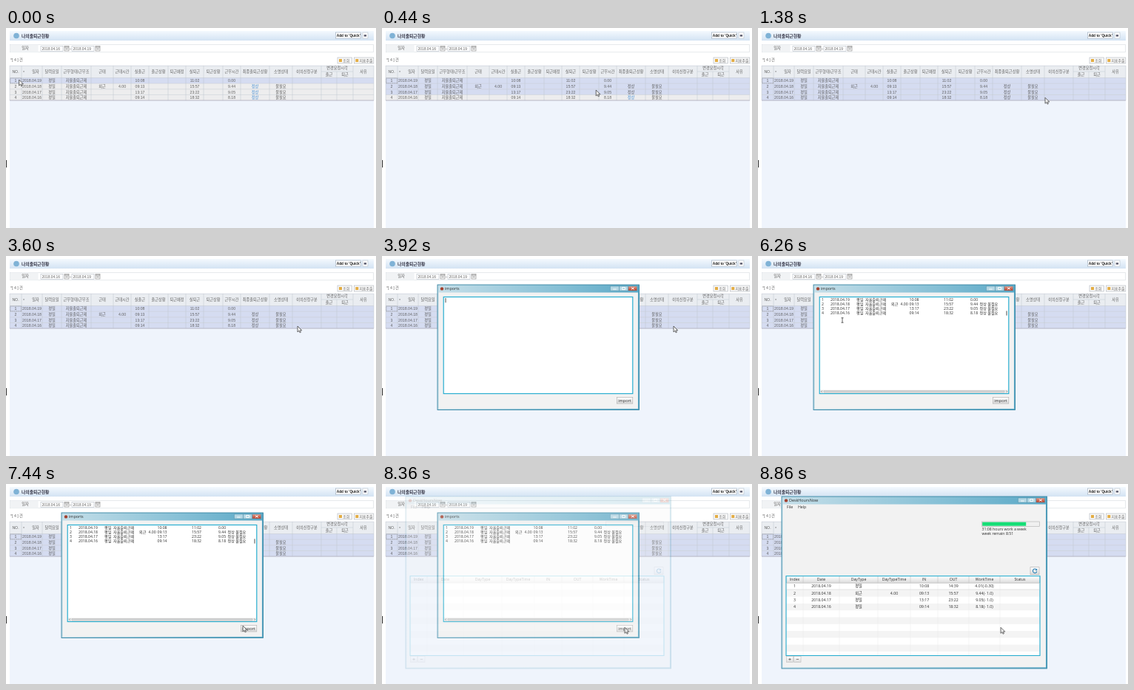
Recreate the animation shown at these times as an HTML page. Size 500 by 271 pixels, loop 9.02 s.

```html
<!DOCTYPE html>
<html>
<head>
<meta charset="utf-8">
<title>Timesheet import</title>
<style>
html, body { margin: 0; width: 100%; height: 100%; overflow: hidden; background: #fff; }
svg { display: block; width: 500px; height: 271px; }
text { font: 5.2px "Liberation Sans", "Noto Sans CJK KR", "Noto Sans CJK", sans-serif; fill: #606060; white-space: pre; }
.app text { font-family: "Open Sans", "Noto Sans CJK KR", "Noto Sans CJK", sans-serif; fill: #2c2c2c; }
</style>
</head>
<body>
<svg id="stage" viewBox="0 0 500 271">
  <defs>
    <linearGradient id="bar" x2="0" y2="1"><stop stop-color="#f4f9fe"/><stop offset="1" stop-color="#d3e3f3"/></linearGradient>
    <linearGradient id="glass"><stop stop-color="#c6dfe9"/><stop offset=".6" stop-color="#86c0d6"/><stop offset="1" stop-color="#5aa8c6"/></linearGradient>
    <linearGradient id="face" x2="0" y2="1"><stop stop-color="#fff"/><stop offset="1" stop-color="#dcdcdc"/></linearGradient>
    <linearGradient id="close" x2="0" y2="1"><stop stop-color="#e39a88"/><stop offset="1" stop-color="#b93a24"/></linearGradient>
  </defs>
</svg>
<script>
const LOOP = 9020;
const stage = document.getElementById('stage');

function add(parent, tag, attrs = {}, content = '') {
  const el = document.createElementNS('http://www.w3.org/2000/svg', tag);
  for (const k in attrs) el.setAttribute(k, attrs[k]);
  el.textContent = content;
  return parent.appendChild(el);
}
const group = (parent, attrs) => add(parent, 'g', attrs);
const box = (g, x, y, width, height, fill, stroke = 'none', sw = .6) =>
  add(g, 'rect', { x, y, width, height, fill, stroke, 'stroke-width': sw });
const path = (g, d, stroke, sw = .6, fill = 'none') =>
  add(g, 'path', { d, stroke, 'stroke-width': sw, fill });
const label = (g, x, y, str, style = '') => add(g, 'text', { x, y, style }, str);
const mid = (g, x, y, str, style = '') => label(g, x, y, str, 'text-anchor:middle;' + style);
const show = (el, on) => el.setAttribute('opacity', +on);

// Attendance page
const page = group(stage);
const rowsAt = 67.5, rowH = 7.65;
const cols = [5, 21, 49, 75, 115, 145, 169, 193, 219, 243, 267, 293, 317, 356, 387, 426, 447, 469, 497];
const heads = ['NO.', '', '달력요일', '근무형태/근무조', '근태', '근태시간', '실출근', '출근상황', '퇴근예정',
  '실퇴근', '퇴근상황', '근무시간', '최종출퇴근상황', '소명상태', '이의신청구분', '출근', '퇴근', '사유'];
const days = [
  { date: '2018.04.19', start: '10:08', end: '11:02', hours: '0.00' },
  { date: '2018.04.18', start: '09:13', end: '15:57', hours: '9.44', kind: '외근', off: '4.00', ok: 1 },
  { date: '2018.04.17', start: '13:17', end: '23:22', hours: '9.05', ok: 1 },
  { date: '2018.04.16', start: '09:14', end: '18:32', hours: '8.18', ok: 1 }
];

function drawTop() {
  box(page, 0, 0, 500, 271, '#fff');
  box(page, 5, 98, 492, 173, '#eff4fc');
  box(page, 0, 179, 1, 10, '#333');
  box(page, 5, 4, 492, 13, 'url(#bar)');
  add(page, 'circle', { cx: 14, cy: 10.5, r: 3.8, fill: '#7fb2d6' });
  label(page, 21, 12.8, '나의출퇴근현황', 'font-size:5.8px;font-weight:bold;fill:#334');
  box(page, 445.5, 6, 34, 8, '#fff', '#9aa9ba');
  mid(page, 462.8, 11.8, "Add to 'Quick'", 'font-size:4.8px;font-weight:bold;fill:#222');
  box(page, 482, 6, 7, 8, '#fff', '#b5bfca');
  box(page, 483.7, 9, 3.4, 2.6, '#667');

  box(page, 5.3, 22.3, 491.4, 10.5, '#fff', '#d5dae0');
  box(page, 5.6, 22.6, 38, 10, '#f1f3f5');
  mid(page, 26, 29, '일자');
  [[47, '2018.04.16'], [89, '2018.04.19']].forEach(([x, str]) => {
    box(page, x, 24.3, 30, 7, '#fff', '#b5bcc6');
    label(page, x + 1.5, 29.6, str, 'font-size:4.9px');
    box(page, x + 32, 24.5, 6, 6.5, '#f5f5f5', '#888');
    path(page, `M${x + 32} 26h6M${x + 33.5} 28.3h3`, '#777', .8);
  });
  label(page, 85.6, 29.5, '~');
  label(page, 6, 45.2, '*[ 4 ] 건');
  [[448, 19.5, '조회'], [470.3, 26.5, '지표추출']].forEach(([x, w, str]) => {
    box(page, x, 40, w, 8, '#f8f8f8', '#b0b5bc');
    box(page, x + 2, 42, 4, 4, '#e3ad45');
    label(page, x + 7.2, 45.9, str, 'font-size:4.9px');
  });
}

function drawTable() {
  box(page, 5, 51, 492, 16.5, '#eaedf1');
  const picks = days.map((d, i) => {
    const y = rowsAt + i * rowH;
    box(page, 5, y, 492, rowH, '#ededee');
    return box(page, 5, y, 492, rowH, '#d5dcf1');
  });
  const bottom = rowsAt + 4 * rowH;
  let lines = `M5 51.2H497M426 59H469`;
  for (let i = 0; i < 5; i++) lines += `M5 ${rowsAt + i * rowH}H497`;
  cols.forEach((x, i) => lines += `M${x} ${i == 16 ? 59 : 51}V${bottom}`);
  path(page, lines, '#bfc4cf', .5);
  path(page, `M5 ${bottom}H497`, '#aaa8b8', .6);

  heads.forEach((h, i) => mid(page, (cols[i] + cols[i + 1]) / 2, i == 15 || i == 16 ? 64.6 : 60.6, h));
  label(page, 23, 61.6, '*');
  mid(page, 40, 60.6, '일자');
  mid(page, 447.5, 56.4, '변경요청시각');

  const links = days.map((d, i) => {
    const y = rowsAt + i * rowH + 5.7;
    const cell = (c, str) => str && mid(page, (cols[c] + cols[c + 1]) / 2, y, str);
    cell(0, i + 1); cell(1, d.date); cell(2, '평일'); cell(3, '자율출퇴근제');
    cell(4, d.kind); cell(5, d.off); cell(6, d.start); cell(9, d.end); cell(11, d.hours);
    cell(13, d.ok && '불필요');
    return cell(12, d.ok && '정상');
  });
  add(page, 'rect', { x: 5.8, y: 68, width: 14.8, height: 6.8, fill: 'none', stroke: '#777', 'stroke-width': .6, 'stroke-dasharray': '1 .6' });
  return { picks, links };
}

function drawWindow(x, y, w, h, title) {
  const g = group(stage, { class: 'app' }), r = x + w;
  box(g, x, y, w, h, 'url(#glass)', '#3585a3', .9);
  box(g, x + 1.6, y + 10.5, w - 3.2, h - 12.1, '#f2f2f2');
  add(g, 'circle', { cx: x + 6, cy: y + 5.4, r: 2.2, fill: '#a3402e' });
  label(g, x + 10, y + 7.4, title, 'font-size:5.4px');
  [-39, -26.8, -14.6].forEach((dx, i) =>
    box(g, r + dx, y + 2, 11.8, 6, i == 2 ? 'url(#close)' : '#b4d7e4', '#5a94ab', .5));
  path(g, `M${r - 35.3} ${y + 6}h4.5M${r - 22.9} ${y + 3.5}h4v3h-4zM${r - 10.7} ${y + 3.5}l4 3m0-3l-4 3`, '#fff', .9);
  return g;
}

// Import dialog
function drawDialog() {
  const g = drawWindow(75, 39, 272.5, 169.5, 'imports');
  box(g, 83.2, 55.5, 255.6, 131, '#fff', '#28aed0', 1.2);
  box(g, 317.3, 191.3, 21.5, 8.7, 'url(#face)', '#aaa');
  mid(g, 328, 197.5, 'import', 'font-size:5.6px');
  const pasted = group(g);
  days.forEach((d, i) => {
    const put = (x, str) => str && label(pasted, x, 61.4 + i * 6, str, 'font-size:5.1px');
    put(86, i + 1); put(98, d.date); put(133, '평일'); put(145, '자율출퇴근제');
    put(180, d.kind); put(192.5, d.off); put(204.5, d.start); put(251, d.end); put(287, d.hours);
    put(299.5, d.ok && '정상 불필요');
  });
  box(pasted, 84, 181.5, 254, 4.4, '#e8e8e8');
  box(pasted, 89, 182.2, 244, 3, '#d2d2d2', '#bbb', .4);
  path(pasted, 'M86.8 182.4l-1.4 1.3 1.4 1.3M335.4 182.4l1.4 1.3-1.4 1.3', '#666');
  const caret = box(g, 0, 0, .8, 6.2, '#222');
  return { g, pasted, caret };
}

// Result window
function drawResult() {
  const g = drawWindow(32, 17, 358.5, 233, 'DeskHoursNow');
  label(g, 39, 33, 'File');
  label(g, 54, 33, 'Help');
  box(g, 302.5, 51, 78, 6.3, '#f0f0f0', '#b0b0b0');
  box(g, 368, 112.7, 12, 10, 'url(#face)', '#aaa');
  path(g, 'M376.3 116a2.8 2.8 0 1 0 .6 2.5', '#2a80b5', 1.1);
  path(g, 'M377.2 114.5v2.7h-2.7z', 'none', 0, '#2a80b5');

  const edges = [38, 61, 110, 162, 206, 243, 285, 327, 381], top = 134, h = 9.3;
  const cell = (parent, c, y, str) => str && mid(parent, (edges[c] + edges[c + 1]) / 2, y, str);
  box(g, 38, 124.7, 343, 107.8, '#fff');
  for (let i = 1; i < 10; i += 2) box(g, 38, top + i * h, 343, h, '#f4f4f4');
  box(g, 38, 124.7, 343, 9.3, 'url(#face)');
  path(g, edges.map(x => `M${x} 125V${top}`).join('') + `M38 ${top}H381`, '#bbb', .5);
  path(g, edges.map(x => `M${x} ${top}V232`).join(''), '#e9e9e9', .5);
  ['Index', 'Date', 'DayType', 'DayTypeTime', 'IN', 'OUT', 'WorkTime', 'Status']
    .forEach((str, c) => cell(g, c, 131.2, str));
  box(g, 38, 124.7, 343, 107.8, 'none', '#28aed0', 1.1);
  [38.3, 48.7].forEach((x, i) => {
    box(g, x, 233.7, 9.3, 7.8, 'url(#face)', '#b5b5b5', .5);
    path(g, `M${x + 3} 237.5h3.4` + (i ? '' : `m-1.7-1.7v3.4`), '#555', .7);
  });

  const data = group(g);
  box(data, 303.2, 51.7, 59, 5, '#16de76');
  label(data, 302.5, 63.4, '31:08 hours work a week');
  label(data, 302.5, 69.4, 'week remain 8:51');
  const work = ['4.01(-0.30)', '9.44(- 1.0)', '9.05(- 1.0)', '8.18(- 1.0)'];
  days.forEach((d, i) => [i + 1, d.date, d.kind || '평일', d.off, d.start, i ? d.end : '14:39', work[i]]
    .forEach((str, c) => cell(data, c, top + i * h + 6.3, str)));
  box(data, 38.8, 134.6, 341.4, 8.4, 'none', '#c8c8c8', .5);
  return { g, data };
}

drawTop();
const table = drawTable();
const dialog = drawDialog();
const result = drawResult();
const arrow = path(stage, 'M0 0V8L1.9 6.3 3.1 8.9 4.4 8.3 3.3 5.8H5.8Z', '#333', .7, '#eee');
const beam = path(stage, 'M-1.5-3.2H1.5M0-3.2V3.2M-1.5 3.2H1.5', '#222', .7);

// Pointer stops: time, x, y, eased
const stops = [[0, 17, 70], [440, 289, 84], [920, 375, 88.5], [1360, 388, 94.3], [1720, 388, 94.3], [1840, 394, 95],
  [4320, 394, 95], [4900, 114, 87, 1], [6700, 114, 87], [7440, 320, 192, 1], [7600, 323, 194], [7800, 328, 194.3], [LOOP, 328, 194.3]];

function pointer(t) {
  const i = stops.findIndex(s => s[0] > t), a = stops[i - 1], b = stops[i];
  let k = (t - a[0]) / (b[0] - a[0]);
  if (b[3]) k = k * k * (3 - 2 * k);
  return [a[1] + (b[1] - a[1]) * k, a[2] + (b[2] - a[2]) * k];
}
const fade = (t, from, span) => Math.max(0, Math.min(1, (t - from) / span));

function draw(t) {
  const [x, y] = pointer(t);
  const count = t > 1840 ? 4 : Math.min(4, Math.floor((y - rowsAt) / rowH) + 1);
  table.picks.forEach((p, i) => show(p, i < count));
  table.links.forEach((l, i) => l && (l.style.fill = i < count ? '#555' : '#3d8ad4'));

  show(dialog.g, fade(t, 3860, 60));
  const pasted = t >= 6220;
  show(dialog.pasted, pasted);
  dialog.caret.setAttribute('x', pasted ? 335.6 : 85.6);
  dialog.caret.setAttribute('y', pasted ? 74.4 : 57);
  show(dialog.caret, t < 5120 || (t >= 6000 && t < 7940));

  show(result.g, fade(t, 8340, 100));
  show(result.data, fade(t, 8800, 60));

  const typing = t > 3920 && t < 8360 && x > 83 && x < 339 && y > 55 && y < 187;
  show(arrow, !typing);
  show(beam, typing);
  for (const c of [arrow, beam]) c.setAttribute('transform', `translate(${x} ${y})`);
}

const began = performance.now();
function tick() {
  draw((performance.now() - began) % LOOP);
  requestAnimationFrame(tick);
}
tick();
</script>
</body>
</html>
```
